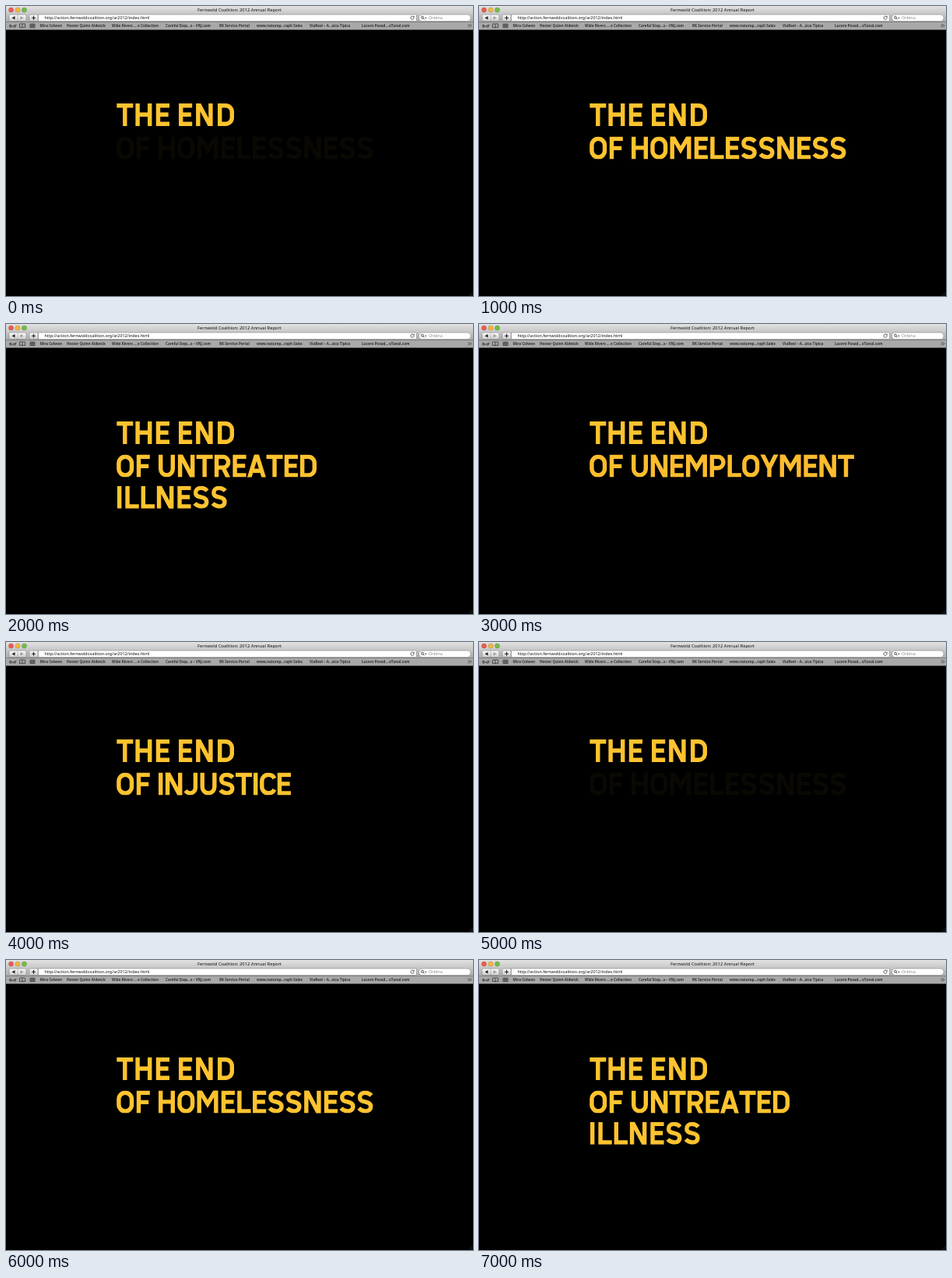
Animation, 600 px wide and 372 px high, one loop 8000 ms. Source, as an HTML page:

```html
<!DOCTYPE html>
<html lang="en">
<head>
<meta charset="utf-8">
<title>The end</title>
<style>
  html, body { margin: 0; width: 100%; height: 100%; overflow: hidden; background: #000; }
  #stage { display: block; width: 600px; height: 372px; }
  text { font-family: "Noto Sans", "Open Sans", sans-serif; fill: #111; }
  .marks text { font-size: 4.6px; font-weight: 700; fill: #333; }
  .button { fill: url(#button); stroke: #777; stroke-width: .5; }
  .field { fill: #fff; stroke: #777; stroke-width: .5; }
  .icon { fill: none; stroke: #333; stroke-width: .8; }
  .lettering { fill: none; stroke-width: 5.4; }
</style>
</head>
<body>
<svg id="stage" viewBox="0 0 600 372" xmlns="http://www.w3.org/2000/svg">
  <defs>
    <linearGradient id="bar" x2="0" y2="1">
      <stop stop-color="#e2e2e2"/><stop offset="1" stop-color="#acacac"/>
    </linearGradient>
    <linearGradient id="button" x2="0" y2="1">
      <stop stop-color="#fafafa"/><stop offset="1" stop-color="#cfcfcf"/>
    </linearGradient>
  </defs>

  <rect width="600" height="372"/>
  <rect width="600" height="20.5" fill="url(#bar)"/>
  <rect y="20.5" width="600" height="10" fill="#a9a9a9"/>
  <path d="M0 20.6H600" stroke="#858585" stroke-width=".5"/>

  <g stroke="#0004" stroke-width=".5">
    <circle cx="6.5" cy="5" r="3.1" fill="#ee5a50"/>
    <circle cx="15" cy="5" r="3.1" fill="#f4b63d"/>
    <circle cx="23.5" cy="5" r="3.1" fill="#72bd45"/>
  </g>
  <text x="300" y="7" font-size="5.8" text-anchor="middle">Fernwold Coalition: 2012 Annual Report</text>

  <rect class="button" x="4" y="11" width="22" height="8.5" rx="1.5"/>
  <path d="M15 11v8.5" stroke="#888" stroke-width=".5"/>
  <path d="M11.5 13v4.6L7.5 15.3z" fill="#222"/>
  <path d="M18.5 13v4.6L22.5 15.3z" fill="#999"/>
  <rect class="button" x="30" y="11" width="11" height="8.5" rx="1.5"/>
  <path d="M33 15.3h5M35.5 12.8v5" stroke="#222" stroke-width="1.1"/>
  <rect class="field" x="41.5" y="11" width="486" height="8.5"/>
  <text x="49.5" y="17.2" font-size="5.35">http://action.fernwoldcoalition.org/ar2012/index.html</text>
  <path class="icon" d="M523.6 13.7a2.1 2.1 0 1 0 .6 1.6"/>
  <path d="M522.6 14.5h2v-2z" fill="#333"/>
  <rect class="field" x="530.5" y="11" width="66.5" height="8.5" rx="4.2"/>
  <circle class="icon" cx="535" cy="14.7" r="1.5"/>
  <path class="icon" d="M536 15.8l1.7 1.7"/>
  <path d="M538 14.7h2.6l-1.3 1.5z" fill="#333"/>
  <text x="543" y="17.2" font-size="5.5" style="fill:#888">Orbina</text>

  <g class="icon">
    <circle cx="6" cy="26" r="1.3"/><circle cx="11" cy="26" r="1.3"/>
    <path d="M4.6 26l1-2.5M7.3 26h2.4M12.3 26l.8-2.5"/>
    <path d="M21 23.2v4.6M21 23.2q-2-1-3.6 0v4.3q1.8-.8 3.6.3 1.8-1.1 3.6-.3v-4.3q-1.6-1-3.6 0"/>
    <path d="M31 23.2h6v4.4h-6zM33 23v4.6M35 23v4.6M31 25.4h6"/>
    <path d="M593.5 23.2l1.9 2-1.9 2M596 23.2l1.9 2-1.9 2"/>
  </g>
  <g class="marks" id="marks"></g>
  <path d="M595 371.5l4.5-4.5M597.5 371.5l2-2" stroke="#444" stroke-width=".6"/>

  <g id="top"></g>
  <g id="rest"></g>
</svg>

<script>
const CAP = 29, YELLOW = '#fec32f', AMBER = '#fdbc2e';
const $ = id => document.getElementById(id);

function add(parent, tag, attrs, text = '') {
  const el = document.createElementNS('http://www.w3.org/2000/svg', tag);
  for (const key in attrs) el.setAttribute(key, attrs[key]);
  el.textContent = text;
  return parent.appendChild(el);
}

const bookmarks = [
  [43.5, 'Mira Colwen'], [78, 'Hester Quinn Aldwick'], [136, 'Wide Rivers ... e Collection'],
  [205, 'Careful Step…s – VNJ.com'], [274, 'RK Service Portal'],
  [322, 'www.naturep…raph Sales'], [390, 'ViaReel – A…sica Típica'],
  [457, 'Lucero Posad…'], [492, 'oTunal.com']
];
for (const [x, label] of bookmarks) add($('marks'), 'text', { x, y: 27.2 }, label);

// Condensed lettering drawn as strokes: [ink width, path].
const stem = x => `M${x} 0v${CAP}`;
const arm = (y, end) => `M2.7 ${y}H${end}`;
const bowl = (run, r) => stem(2.7) + `M2.7 2.7h${run}a${r} ${r} 0 0 1 0 ${2 * r}H2.7`;
const slant = (x1, y1, x2, y2) => `M${x1} ${y1}L${x2} ${y2}`;

const straight = {
  I: [5.4, stem(2.7)],
  L: [17.4, stem(2.7) + arm(26.3, 17.4)],
  F: [17, stem(2.7) + arm(2.7, 17) + arm(14.8, 15.4)],
  E: [17.2, stem(2.7) + arm(2.7, 17.2) + arm(14.3, 15.8) + arm(26.3, 17.2)],
  H: [21, stem(2.7) + stem(18.3) + arm(14.3, 18.3)],
  T: [21, 'M0 2.7H21' + stem(10.5)],
  N: [21.5, stem(2.7) + stem(18.8) + slant(2, -2, 19.5, 31)],
  M: [27, stem(2.7) + stem(24.3) + 'M2.1-2L13.5 17 24.9-2'],
  A: [24, slant(2.2, 31, 12.4, -2) + slant(21.8, 31, 11.6, -2) + 'M6 20.7H18'],
  V: [23, slant(2.2, -2, 12, 31) + slant(20.8, -2, 11, 31)],
  Y: [23, 'M2-2L11.5 17 21-2M11.5 15V29']
};
const round = {
  O: [22, 'M2.7 11a8.3 8.3 0 0 1 16.6 0v7a8.3 8.3 0 0 1-16.6 0z'],
  C: [20, 'M18.8 7.4Q16.4 2.7 10.9 2.7a8.2 8.2 0 0 0-8.2 8.2v7.2a8.2 8.2 0 0 0 8.2 8.2Q16.4 26.3 18.8 21.6'],
  D: [21, 'M2.7 2.7h7.6a8 8 0 0 1 8 8v7.6a8 8 0 0 1-8 8H2.7z'],
  U: [21, 'M2.7 0v18.5a7.8 7.8 0 0 0 15.6 0V0'],
  J: [17, 'M14.3 0v19.3a7 7 0 0 1-7 7Q4 26.3 1.5 23'],
  P: [20, bowl(7.4, 7.2)],
  R: [20.5, bowl(8.2, 6.9) + slant(10.6, 15.5, 18.2, 31)],
  S: [20.5, 'M18.2 6.3Q15 2.7 10.4 2.7C6 2.7 3.4 5 3.4 8.7 3.4 13 7 13.7 10.4 14.4S17.5 16 17.5 20.2 14.5 26.3 10.4 26.3Q5.6 26.3 2.2 22.4']
};
const glyphs = { ...straight, ...round };

// Flat sides take most room, round ones less, open ones least.
const side = (c, flat, open) => flat.includes(c) ? 1 : open.includes(c) ? .15 : .55;
const room = (left, right) =>
  side(left, 'HNMUIJ', 'LTAVY') + side(right, 'HNMUIELFDPR', 'TAVY');

function drawWord(parent, word, start, end) {
  const letters = [...word];
  const gaps = letters.slice(1).map((c, i) => room(letters[i], c));
  const ink = letters.reduce((sum, c) => sum + glyphs[c][0], 0);
  const unit = (end - start - ink) / gaps.reduce((a, b) => a + b, 0);
  let x = start;
  letters.forEach((c, i) => {
    add(parent, 'path', { d: glyphs[c][1], transform: `translate(${x.toFixed(2)})` });
    x += glyphs[c][0] + (gaps[i] || 0) * unit;
  });
}

function drawLine(parent, y, words) {
  const line = add(parent, 'svg', {
    y, width: 600, height: CAP, class: 'lettering',
    role: 'img', 'aria-label': words.map(w => w[0]).join(' ')
  });
  for (const w of words) drawWord(line, ...w);
}

const OF = ['OF', 142.2, 184.8];
const phrases = {
  homelessness: [[OF, ['HOMELESSNESS', 196, 471.7]]],
  illness: [[OF, ['UNTREATED', 196, 399]], [['ILLNESS', 143, 284]]],
  unemployment: [[OF, ['UNEMPLOYMENT', 196, 482]]],
  injustice: [[OF, ['INJUSTICE', 196, 366]]]
};
const tops = [167.6, 207.7];

$('top').setAttribute('stroke', YELLOW);
drawLine($('top'), 125, [['THE', 142.3, 210], ['END', 222, 293]]);

const groups = {};
for (const name in phrases) {
  groups[name] = add($('rest'), 'g', { stroke: name === 'unemployment' ? AMBER : YELLOW });
  phrases[name].forEach((words, i) => drawLine(groups[name], tops[i], words));
}

// One step per second: phrase and its opacity.
const FAINT = .04;
const steps = [
  ['homelessness', FAINT], ['homelessness', 1], ['illness', 1], ['unemployment', 1],
  ['injustice', 1], ['homelessness', FAINT], ['homelessness', 1], ['illness', 1]
];

function render(ms) {
  const [current, opacity] = steps[Math.floor(ms / 1000) % steps.length];
  for (const name in groups) {
    groups[name].setAttribute('display', name === current ? 'inline' : 'none');
    groups[name].setAttribute('opacity', opacity);
  }
}

let begin;
function tick(now) {
  begin ??= now;
  render(now - begin);
  requestAnimationFrame(tick);
}
render(0);
requestAnimationFrame(tick);
</script>
</body>
</html>
```
